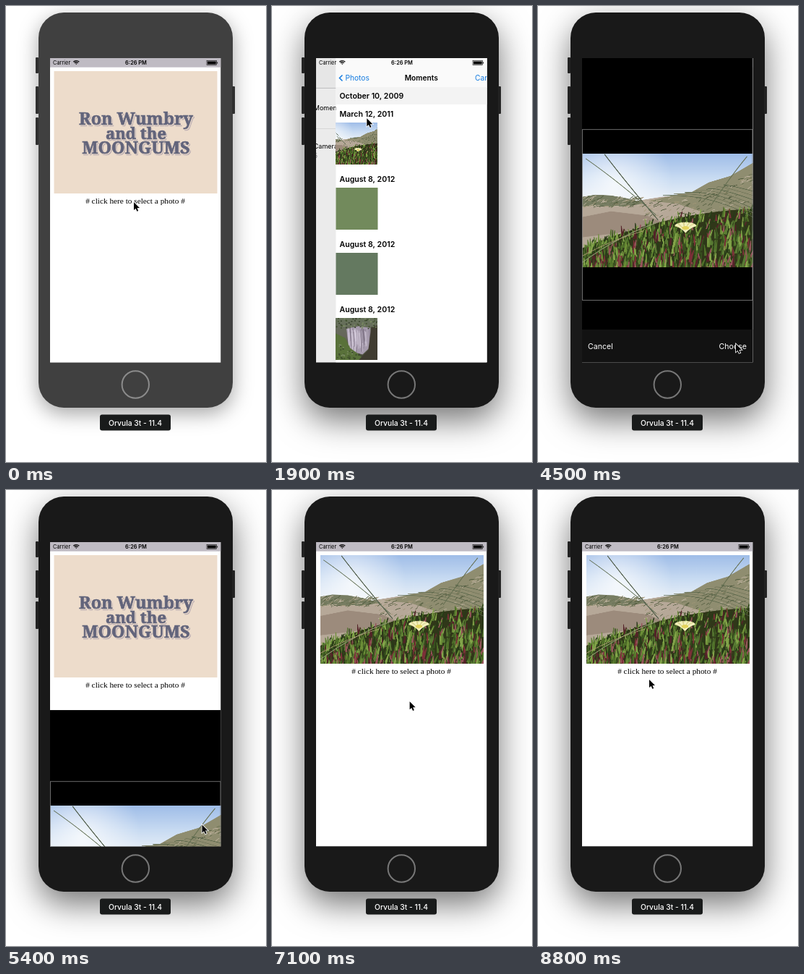
An HTML page with a canvas that plays this animation: 360 px wide and 630 px high, repeating every 9000 ms.

```html
<!DOCTYPE html>
<html lang="en">
<head>
<meta charset="utf-8">
<title>Photo picker on a phone</title>
<style>
  html, body { margin: 0; width: 100%; height: 100%; overflow: hidden; background: #fff; }
  canvas { display: block; }
</style>
</head>
<body>
<canvas id="stage" width="360" height="630"></canvas>
<script>
const LOOP = 9000, STEP = 100;
const SCREEN = { x: 61, y: 72, w: 236.5, h: 420.5 };
const SANS = 'Inter, Roboto, sans-serif';
const SERIF = '"Liberation Serif", serif';
const ctx = document.getElementById('stage').getContext('2d');

const clamp = v => Math.max(0, Math.min(1, v));
const smooth = v => { v = clamp(v); return v * v * (3 - 2 * v); };
// Critically damped spring, used for pushes and sheets.
const spring = ms => {
  const k = Math.max(0, ms) * 0.0185;
  return ms > 550 ? 1 : 1 - (1 + k) * Math.exp(-k);
};

function randomizer(seed) {
  return () => {
    seed = (seed * 1664525 + 1013904223) % 4294967296;
    return seed / 4294967296;
  };
}

function makePicture(w, h, paint) {
  const canvas = document.createElement('canvas');
  canvas.width = w * 2;
  canvas.height = h * 2;
  const g = canvas.getContext('2d');
  g.scale(2, 2);
  paint(g, w, h);
  return canvas;
}

function gradient(g, h, ...colors) {
  const fill = g.createLinearGradient(0, 0, 0, h);
  colors.forEach((c, i) => fill.addColorStop(i / (colors.length - 1), c));
  return fill;
}

function shape(g, color, points) {
  g.fillStyle = color;
  g.beginPath();
  points.forEach(p => g.lineTo(...p));
  g.fill();
}

function curve(g, color, width, x0, y0, cx, cy, x1, y1) {
  g.strokeStyle = color;
  g.lineWidth = width;
  g.beginPath();
  g.moveTo(x0, y0);
  g.quadraticCurveTo(cx, cy, x1, y1);
  g.stroke();
}

function paintDunes(g, w, h) {
  const rnd = randomizer(7);
  g.fillStyle = gradient(g, 68, '#9fbde8', '#c8dbf2', '#eef3f8');
  g.fillRect(0, 0, w, h);
  const glow = g.createRadialGradient(45, 42, 2, 45, 42, 80);
  glow.addColorStop(0, 'rgba(255,255,255,.75)');
  glow.addColorStop(1, 'rgba(255,255,255,0)');
  g.fillStyle = glow;
  g.fillRect(0, 0, w, 80);

  shape(g, '#b6a898', [[0, 68], [60, 68], [110, 60], [150, 56], [236, 44], [236, 157], [0, 157]]);
  shape(g, '#8f8d70', [[92, 66], [125, 58], [152, 53], [175, 40], [205, 31], [236, 13], [236, 80], [170, 82], [130, 69]]);
  shape(g, '#777d62', [[0, 60], [18, 57], [40, 58], [62, 62], [88, 69], [60, 73], [0, 73]]);
  shape(g, '#9c8b7c', [[0, 88], [40, 80], [90, 86], [110, 95], [50, 110], [0, 116]]);
  for (let i = 0; i < 260; i++) {
    const x = rnd() * w, right = x > 120;
    const y = right ? 70 - (x - 120) * 0.36 + rnd() * 38 : 62 + rnd() * (x < 80 ? 13 : 38);
    const tint = ['#6d7354', '#a19778', '#515b3e', '#c1b4a1'][i % 4];
    curve(g, tint, 0.8, x, y, x + 2, y - 2, x + 3 + rnd() * 5, y - 3 * rnd() - 1);
  }

  const edge = x => 131 - 0.42 * x + 0.0008 * x * x;
  g.fillStyle = '#303719';
  g.beginPath();
  g.moveTo(0, h);
  for (let x = 0; x <= w; x += 4) g.lineTo(x, edge(x));
  g.lineTo(w, h);
  g.fill();
  const greens = ['#4f7029', '#6d8f38', '#38501f', '#83a54a', '#293a18', '#587a33'];
  const reds = ['#7c3038', '#552329', '#96545a'];
  for (let i = 0; i < 850; i++) {
    const depth = i / 850, x = rnd() * w, top = edge(x);
    const y = top + 3 + depth * (h + 12 - top), len = 6 + rnd() * 9 + depth * 5;
    const lean = (rnd() - 0.4) * 8, wide = 1.2 + depth * 1.2;
    const tints = rnd() < 0.1 + depth * 0.26 ? reds : greens;
    shape(g, tints[Math.floor(rnd() * tints.length)],
      [[x - wide, y], [x + lean - 0.3, y - len], [x + lean + 0.8, y - len + 1], [x + wide, y]]);
  }

  curve(g, '#4c5945', 1.1, 31, 1, 63, 43, 105, 92);
  curve(g, '#68755b', 1, 5, 7, 55, 42, 102, 85);
  curve(g, '#919a72', 1, 0, 151, 52, 113, 103, 96);
  curve(g, '#b09a76', 0.8, 0, 142, 40, 120, 85, 107);
  for (let i = 0; i < 7; i++)
    curve(g, i % 2 ? '#72765a' : '#59664a', 0.8, 236, 88 - i * 6, 180, 56 - i * 3, 112 + i * 15, 58 - i * 2);
  curve(g, '#667052', 1, 178, 72, 205, 32, 228, 4);

  g.lineCap = 'round';
  for (let i = 0; i <= 14; i++) {
    const a = Math.PI * (1.08 + 0.84 * i / 14);
    curve(g, i % 3 ? '#f4f1bd' : '#d9d491', 2.5, 143, 108, 143 + 7 * Math.cos(a), 102 + 3 * Math.sin(a),
      143 + 14 * Math.cos(a), 101 + 5 * Math.sin(a));
  }
  g.fillStyle = '#e3d35c';
  g.beginPath();
  g.ellipse(143, 103, 5, 2.5, 0, 0, 7);
  g.fill();
}

function paintWaterfall(g, w, h) {
  const rnd = randomizer(21);
  g.fillStyle = gradient(g, h, '#66735a', '#66645c', '#40462f');
  g.fillRect(0, 0, w, h);
  shape(g, '#a69bad', [[11, 12], [24, 9], [36, 11], [37, 31], [28, 40], [14, 36]]);
  for (let i = 0; i < 45; i++) {
    const x = 11 + rnd() * 25, y = 10 + rnd() * 7;
    curve(g, i % 3 ? 'rgba(220,211,227,.55)' : 'rgba(116,105,123,.6)', 0.8, x, y, x + 1, y + 9, x + 1, y + 12 + rnd() * 14);
  }
  shape(g, '#59713a', [[0, 17], [10, 22], [15, 33], [23, 39], [30, h], [0, h]]);
  shape(g, '#403c31', [[37, 10], [44, 8], [44, h], [24, h], [34, 35]]);
  for (let i = 0; i < 120; i++) {
    g.fillStyle = ['#41522d', '#7b8c62', '#353f2a'][i % 3];
    const low = i % 2, x = rnd() * (low ? 24 : w);
    g.fillRect(x, low ? 27 + x / 2 + rnd() * 20 : rnd() * 11, 1.5, 1.2);
  }
}

const dunes = makePicture(236, 157, paintDunes);
const waterfall = makePicture(44, 46, paintWaterfall);

function text(label, x, y, size, { weight = 400, color = '#000', align = 'left', family = SANS } = {}) {
  ctx.font = `${weight} ${size}px ${family}`;
  ctx.fillStyle = color;
  ctx.textAlign = align;
  ctx.fillText(label, x, y);
}

function rect(color, x, y, w, h) {
  ctx.fillStyle = color;
  ctx.fillRect(x, y, w, h);
}

function roundRect(color, x, y, w, h, r) {
  ctx.fillStyle = color;
  ctx.beginPath();
  ctx.roundRect(x, y, w, h, r);
  ctx.fill();
}

function shifted(dx, dy, draw) {
  ctx.save();
  ctx.translate(dx, dy);
  draw();
  ctx.restore();
}

function drawPhone(active) {
  const side = active ? '#222' : '#303030';
  ctx.save();
  ctx.shadowColor = active ? 'rgba(0,0,0,.55)' : 'rgba(0,0,0,.36)';
  ctx.shadowBlur = active ? 46 : 28;
  ctx.shadowOffsetY = active ? 17 : 8;
  roundRect(active ? '#191919' : '#404040', 45, 9, 269, 546, 35);
  ctx.restore();
  [[41, 71, 22], [41, 111, 38], [41, 154, 38], [313, 111, 38]].forEach(([x, y, h]) => roundRect(side, x, y, 4, h, 1));
  ctx.strokeStyle = active ? '#777' : '#8b8b8b';
  ctx.lineWidth = 2;
  ctx.beginPath();
  ctx.arc(179.3, 523, 18.7, 0, 7);
  ctx.stroke();
  roundRect('#191b1b', 130, 564.5, 98, 22, 3);
  text('Orvula 3t - 11.4', 179, 579.8, 10.3, { weight: 500, color: '#fff', align: 'center' });
}

function drawStatus() {
  text('Carrier', 65, 81, 7.4);
  text('6:26 PM', 180, 81, 7.4, { weight: 600, align: 'center' });
  ctx.strokeStyle = '#000';
  ctx.lineWidth = 1.3;
  [1, 3.2, 5.4].forEach(r => {
    ctx.beginPath();
    ctx.arc(97.3, 81, r, -Math.PI * 0.76, -Math.PI * 0.24);
    ctx.stroke();
  });
  ctx.lineWidth = 0.6;
  ctx.strokeRect(278, 75.6, 13.6, 5.8);
  rect('#000', 278.9, 76.5, 11.8, 4);
  rect('#000', 292.2, 77.5, 0.9, 2);
}

function drawLogo() {
  rect('#eddccb', 66.5, 90, 226, 169);
  const lines = [['Ron Wumbry', 164, 23.5], ['and the', 184, 22], ['MOONGUMS', 204, 23.5]];
  [['#b7aab0', 1.6], ['#eddccb', 0.8], ['#62647b', 0]].forEach(([color, offset]) => {
    for (const [label, y, size] of lines) {
      const x = 180 + offset;
      text(label, x, y + offset, size, { weight: 900, color, align: 'center', family: '"Noto Serif", serif' });
      ctx.strokeStyle = color;
      ctx.lineWidth = 0.7;
      ctx.strokeText(label, x, y + offset);
    }
  });
}

function drawPage(hasPhoto, pull) {
  rect('#fff', SCREEN.x, SCREEN.y, SCREEN.w, SCREEN.h);
  rect('#bfbbc3', SCREEN.x, SCREEN.y, SCREEN.w, 12.7 + pull);
  shifted(0, pull, () => {
    if (hasPhoto) ctx.drawImage(dunes, 66.5, 90, 226, 150);
    else drawLogo();
    text('# click here to select a photo #', 179, hasPhoto ? 254 : 273, 11.3, { align: 'center', family: SERIF });
  });
}

function drawNavBar(title) {
  rect('#fff', SCREEN.x, SCREEN.y, SCREEN.w, SCREEN.h);
  rect('#fafafa', SCREEN.x, SCREEN.y, SCREEN.w, 41);
  rect('#b8b8ba', SCREEN.x, 113, SCREEN.w, 0.7);
  text(title, 179.3, 103, 10.2, { weight: 600, align: 'center' });
  text('Cancel', 287, 103, 10.2, { color: '#147be0', align: 'right' });
}

function chevron(x, y, size, color, width) {
  ctx.strokeStyle = color;
  ctx.lineWidth = width;
  ctx.beginPath();
  ctx.moveTo(x - size, y - Math.abs(size));
  ctx.lineTo(x, y);
  ctx.lineTo(x - size, y + Math.abs(size));
  ctx.stroke();
}

function drawAlbums() {
  drawNavBar('Photos');
  ctx.drawImage(waterfall, 66.5, 117, 43.5, 46);
  ctx.drawImage(waterfall, 66.5, 175.5, 43.5, 46);
  text('Moments', 120.5, 143.5, 9);
  text('Camera Roll', 120.5, 197, 9);
  text('5', 120.5, 210, 9, { color: '#8e8e93' });
  text('My Albums', 66.5, 246.5, 10.2, { weight: 600 });
  rect('#dededf', 66.5, 169, 231, 0.7);
  chevron(287, 141, 3.6, '#c4c4c8', 1.2);
  chevron(287, 199.5, 3.6, '#c4c4c8', 1.2);
}

function drawMoments() {
  drawNavBar('Moments');
  chevron(66, 99.5, -4, '#147be0', 1.5);
  text('Photos', 74, 103, 10.2, { color: '#147be0' });
  rect('#f3f3f3', SCREEN.x, 112, SCREEN.w, 24);
  const heading = (label, y) => text(label, 66, y, 10.6, { weight: 600 });
  heading('October 10, 2009', 128);
  ['March 12, 2011', 'August 8, 2012', 'August 8, 2012', 'August 8, 2012'].forEach((label, i) => {
    const y = 153 + i * 90;
    heading(label, y);
    if (i === 0) ctx.drawImage(dunes, 120, 0, 314, 314, 61, y + 8, 58, 58);
    else if (i === 3) ctx.drawImage(waterfall, 61, y + 8, 58, 58);
    else rect(i === 1 ? '#728a5c' : '#647960', 61, y + 8, 58, 58);
  });
}

function drawCrop() {
  rect('#000', SCREEN.x, SCREEN.y, SCREEN.w, SCREEN.h);
  ctx.drawImage(dunes, SCREEN.x, 203.8, SCREEN.w, 156.7);
  rect('#121212', SCREEN.x, 447, SCREEN.w, 45.5);
  ctx.strokeStyle = '#858585';
  ctx.lineWidth = 0.8;
  ctx.strokeRect(61.5, 170.7, 235.5, 235.7);
  text('Cancel', 69, 473.5, 10.6, { color: '#fff' });
  text('Choose', 289, 473.5, 10.6, { color: '#fff', align: 'right' });
}

// Slides `incoming` from the right while `outgoing` drifts left and dims.
function push(progress, outgoing, incoming, between = () => {}) {
  shifted(-0.3 * SCREEN.w * progress, 0, outgoing);
  rect('#fff', SCREEN.x + SCREEN.w * (1 - 0.3 * progress), SCREEN.y, SCREEN.w, SCREEN.h);
  rect(`rgba(0,0,0,${0.09 * progress})`, SCREEN.x, SCREEN.y, SCREEN.w, SCREEN.h);
  between();
  shifted(SCREEN.w * (1 - progress), 0, incoming);
}

function drawScreen(t) {
  ctx.save();
  ctx.beginPath();
  ctx.rect(SCREEN.x, SCREEN.y, SCREEN.w, SCREEN.h);
  ctx.clip();
  drawPage(t >= 6000, 4.6 * Math.sin(Math.PI * clamp((t - 7400) / 600)));
  if (t < 2500) {
    shifted(0, SCREEN.h * (1 - spring(t - 400)), () => {
      if (t < 1700) drawAlbums();
      else push(spring(t - 1700), drawAlbums, drawMoments);
    });
    drawStatus();
  } else if (t < 5300) {
    push(spring(t - 2500), drawMoments, drawCrop, drawStatus);
  } else {
    drawStatus();
    if (t < 5900) shifted(0, SCREEN.h * spring(t - 5300), drawCrop);
  }
  ctx.restore();
}

// Pointer stops: time, x, y.
const POINTER = [
  [0, 177, 271], [1200, 177, 271], [1500, 150, 142], [1700, 150, 142],
  [2300, 78, 193], [2800, 78, 193], [3900, 274, 467], [5300, 274, 467],
  [6200, 201, 336], [6700, 201, 336], [7300, 187, 277], [7800, 187, 277],
  [8600, 154, 262], [LOOP, 154, 262]
];

function drawPointer(t) {
  const next = POINTER.findIndex(p => p[0] > t);
  const [t0, x0, y0] = POINTER[next - 1], [t1, x1, y1] = POINTER[next];
  const p = smooth((t - t0) / (t1 - t0));
  shifted(x0 + (x1 - x0) * p, y0 + (y1 - y0) * p, () => {
    ctx.beginPath();
    [[0, 0], [0, 11], [2.6, 8.7], [4.4, 12.8], [6.2, 12], [4.5, 8], [8, 8]].forEach(q => ctx.lineTo(...q));
    ctx.closePath();
    ctx.strokeStyle = '#fff';
    ctx.lineWidth = 1.6;
    ctx.stroke();
    ctx.fillStyle = '#000';
    ctx.fill();
  });
}

function frame() {
  const t = Math.floor(performance.now() % LOOP / STEP) * STEP;
  rect('#fff', 0, 0, 360, 630);
  drawPhone(t >= STEP);
  drawScreen(t);
  drawPointer(t);
  requestAnimationFrame(frame);
}
frame();
</script>
</body>
</html>
```
